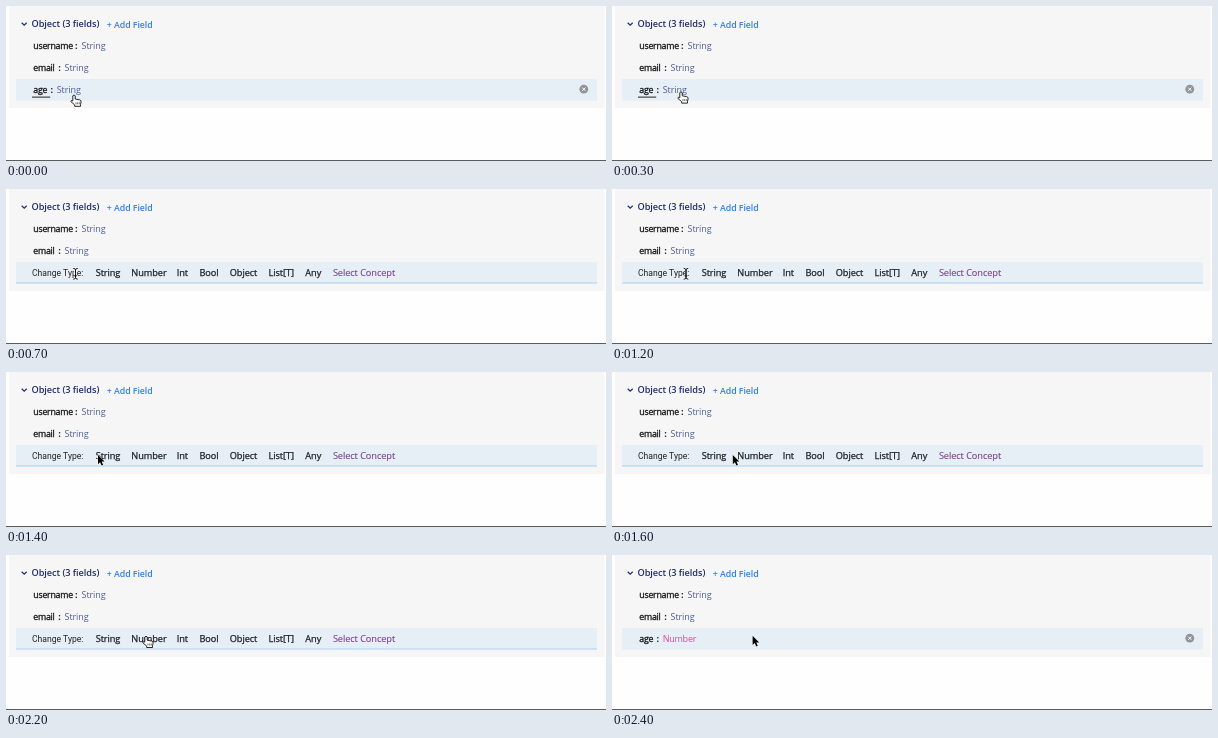
Animation of 600 by 155 pixels, one loop 2800 ms. Source, as an HTML page:

```html
<!DOCTYPE html>
<html lang="en">
<head>
<meta charset="utf-8">
<title>Change a field type</title>
<style>
  html, body { margin: 0; width: 100%; height: 100%; overflow: hidden; background: #fefefe; }
  svg { display: block; width: 100vw; height: 100vh; }
  text { font: 400 9px "Open Sans", "Noto Sans", sans-serif; letter-spacing: -.06px; }
  .title { font-size: 9.2px; font-weight: 600; fill: #1f2b6c; }
  .add { font-size: 8.8px; font-weight: 600; fill: #2f7fe6; }
  .name { font-size: 8.8px; letter-spacing: -.25px; fill: #161616; stroke: #161616; stroke-width: .3px; }
  .colon { font-weight: 700; fill: #161616; text-anchor: middle; }
  .type { fill: #4c5c92; }
  .number { fill: #d9489a; letter-spacing: -.25px; }
  .label { font: 400 8.6px Roboto, "Liberation Sans", sans-serif; letter-spacing: 0; fill: #222; }
  .option { font-size: 9.2px; fill: #1b1f27; stroke: #1b1f27; stroke-width: .25px; text-anchor: middle; }
  .concept { fill: #7b3f8c; stroke: #7b3f8c; stroke-width: .12px; }
</style>
</head>
<body>
<svg viewBox="0 0 600 155">
  <rect x="3" width="595.5" height="102" fill="#f6f6f7"/>
  <rect y="154" width="600" height="1" fill="#5c5c5c"/>
  <path d="M15.7 16.8l2.5 2.4 2.5-2.4" fill="none" stroke="#1f2b6c" stroke-width="1.2"/>
  <text class="title" x="25.5" y="21.2">Object (3 fields)</text>
  <text class="add" x="100.8" y="21.7">+ Add Field</text>
  <rect x="10" y="73" width="581" height="21.5" fill="#e6eef6"/>
  <g id="fields"></g>
  <g id="age">
    <text class="type" id="string" x="50.7" y="86.8">String</text>
    <text class="type number" id="number" x="50.7" y="86.8">Number</text>
    <rect id="underline" x="26" y="90.6" width="18.2" height="1" fill="#222"/>
    <circle cx="577.8" cy="83.2" r="4.4" fill="#929497"/>
    <path d="M576.2 81.6l3.2 3.2m0-3.2l-3.2 3.2" stroke="#fff" stroke-width="1"/>
  </g>
  <g id="menu">
    <rect x="10" y="93.4" width="581" height="1.1" fill="#b4d5f4"/>
    <text class="label" x="26" y="86.7">Change Type:</text>
  </g>
  <g id="hand" fill="#fff" stroke="#111" stroke-width=".9" stroke-linejoin="round">
    <path d="M-1.2.8Q0-.8 1.2.8V4L5.8 4.9Q7.3 5.3 7.1 7L6.5 9.4V11.3H.7V9.9L-3.1 6.6Q-3.2 4.8-1.2 5.9Z"/>
    <path d="M2 7.3V9.3M3.7 7.3V9.3M5.3 7.3V9.3" stroke-width=".6"/>
  </g>
  <g id="beam" fill="none">
    <path id="stem" d="M-2.3-5.4Q0-5.4 0-3.8V3.8Q0 5.4-2.3 5.4M2.3-5.4Q0-5.4 0-3.8V3.8Q0 5.4 2.3 5.4M-1.4 2H1.4" stroke="#fff" stroke-width="2"/>
    <use href="#stem" style="stroke:#111"/>
    <path d="M-2.3-5.4Q0-5.4 0-3.8V3.8Q0 5.4-2.3 5.4M2.3-5.4Q0-5.4 0-3.8V3.8Q0 5.4 2.3 5.4M-1.4 2H1.4" stroke="#111" stroke-width="1"/>
  </g>
  <path id="arrow" d="M0 0V9.2L2.1 7.2 3.6 10.6 5.2 9.9 3.7 6.6H6.6Z" fill="#000" stroke="#fff" stroke-width=".8" paint-order="stroke"/>
</svg>
<script>
const $ = id => document.getElementById(id);
const LOOP = 2800;

function addText(parent, cls, x, y, str) {
  const el = document.createElementNS("http://www.w3.org/2000/svg", "text");
  el.setAttribute("class", cls);
  el.setAttribute("x", x);
  el.setAttribute("y", y);
  el.textContent = str;
  parent.append(el);
}

function addField(parent, name, colonX, y) {
  addText(parent, "name", 27.3, y, name);
  addText(parent, "colon", colonX, y - .3, ":");
}

addField($("fields"), "username", 70.3, 43.2);
addText($("fields"), "type", 75.5, 43.2, "String");
addField($("fields"), "email", 53.5, 65);
addText($("fields"), "type", 58.5, 65, "String");
addField($("age"), "age", 45.8, 86.8);

const options = [["String", 102], ["Number", 143], ["Int", 176.3], ["Bool", 203],
  ["Object", 237.5], ["List[T]", 275.3], ["Any", 307.3]];
for (const [str, x] of options) addText($("menu"), "option", x, 86.8, str);
addText($("menu"), "option concept", 358, 86.8, "Select Concept");

// start time, pointer shape, x, y
const steps = [
  [0, "hand", 68, 89], [100, "hand", 68.3, 88], [200, "hand", 68.7, 86.8],
  [300, "hand", 69, 85.8], [400, "hand", 69.2, 85.3],
  [700, "beam", 69.5, 84.8], [1200, "beam", 74, 84.8], [1300, "beam", 77.5, 84.6],
  [1400, "arrow", 92, 83], [1500, "arrow", 109, 83], [1600, "arrow", 120.8, 83],
  [1700, "hand", 138.5, 81.8], [1900, "hand", 139.5, 81.4], [2000, "hand", 140, 81.2],
  [2400, "arrow", 140.6, 80.8]
];

const show = (id, on) => { $(id).style.display = on ? "" : "none"; };

function draw(t) {
  const [, shape, x, y] = steps.findLast(s => s[0] <= t);
  const menuOpen = t >= 700 && t < 2300;
  show("menu", menuOpen);
  show("age", !menuOpen);
  show("underline", t < 600);
  show("string", t < 700);
  show("number", t >= 2300);
  for (const id of ["hand", "beam", "arrow"]) show(id, id === shape);
  $(shape).setAttribute("transform", `translate(${x} ${y})`);
}

const start = performance.now();
function tick() {
  draw((performance.now() - start) % LOOP);
  requestAnimationFrame(tick);
}
tick();
</script>
</body>
</html>
```
